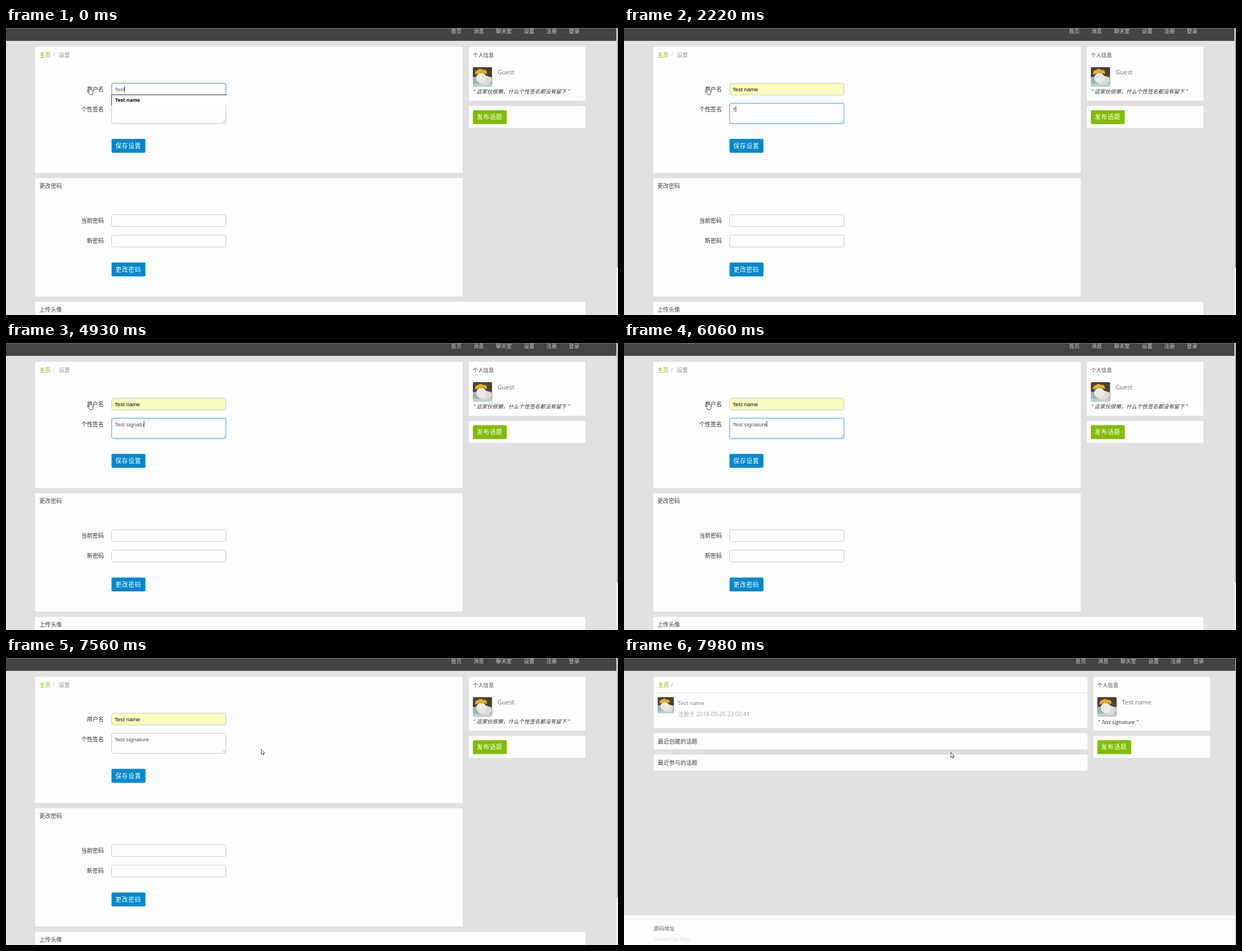
An HTML page for the animation above (8000 ms loop, 1092 by 513 pixels).

```html
<!DOCTYPE html>
<html lang="zh-CN">
<head>
<meta charset="utf-8">
<style>
html, body { margin: 0; width: 100%; height: 100%; overflow: hidden; background: #e1e1e1; }
svg { display: block; width: 1092px; height: 513px; }
text { font-family: "Open Sans", "Noto Sans CJK SC", "Noto Sans CJK", sans-serif; white-space: pre; }
.arial { font-family: "Liberation Sans", Arial, sans-serif; font-size: 9.85px; }
.focus { fill: none; stroke: #52a8ec; stroke-opacity: .85; filter: drop-shadow(0 0 1.5px rgba(82,168,236,.6)); }
</style>
</head>
<body>
<svg viewBox="0 0 1092 513">
  <defs>
    <symbol id="avatar" viewBox="0 0 34 34">
      <rect width="34" height="34" rx="2" fill="#4b4135"/>
      <path d="M0 17H34V32Q34 34 32 34H2Q0 34 0 32Z" fill="#9db5b0"/>
      <path d="M0 29H34V32Q34 34 32 34H2Q0 34 0 32Z" fill="#b9d3d2"/>
      <ellipse cx="21" cy="23" rx="12" ry="8" fill="#dedbd6"/>
      <ellipse cx="15" cy="19" rx="9" ry="9" fill="#ece9e4"/>
      <path d="M4 13Q3 6 9 5Q14 1 18 5Q25 3 25 12Q15 9 4 13Z" fill="#e2ae27"/>
    </symbol>
  </defs>
  <g id="settings"></g>
  <g id="profile"></g>
  <g stroke="#222" stroke-width=".8" fill="#fff" stroke-linejoin="round">
    <path id="hand" d="M3 1q0-1 1-1t1 1V5l3.5.8q1.5.4 1.5 1.8V10l-1 4H4L.5 8.8q-.3-1.2.8-1L3 9.2Z"/>
    <path id="arrow" d="M0 0V9.2L2.1 7.2 3.6 10.7 5 10.1 3.6 6.8H6.4Z"/>
  </g>
</svg>
<script>
const $ = id => document.getElementById(id);
const LOOP = 8000;

// Text is placed by its left edge and vertical centre.
const text = (x, cy, size, fill, s, extra = '') =>
  `<text x="${x}" y="${cy + size * .37}" font-size="${size}" fill="${fill}" ${extra}>${s}</text>`;
const rect = (x, y, w, h, fill, extra = '') =>
  `<rect x="${x}" y="${y}" width="${w}" height="${h}" fill="${fill}" ${extra}/>`;
const panel = (x, y, w, h) => rect(x, y, w, h, '#fdfdfd', 'rx="2"');
const label = (cy, s) => text(174.5, cy, 10.1, '#333', s, 'text-anchor="end"');
const field = (y, h, id = '') =>
  rect(188.5, y, 204, h, '#fdfdfd', `rx="3" stroke="#c8c8c8" id="${id}"`);
const focusRing = (y, h, id) => `<rect class="focus" id="${id}" x="188.5" y="${y}" width="204" height="${h}" rx="3"/>`;
const button = (x, y, fill, s, id = '') =>
  rect(x, y, 60.5, 24.7, fill, `rx="2" id="${id}"`) +
  text(x + 7, y + 12.4, 10.8, '#fff', s, 'letter-spacing=".65"');
const avatar = (x, y, size) => `<use href="#avatar" x="${x}" y="${y}" width="${size}" height="${size}"/>`;

const navItems = [['首页', 794], ['消息', 834], ['聊天室', 874.3], ['设置', 924], ['注册', 964], ['登录', 1004.3]];
const frame = (dx, name) =>
  rect(0, 0, 1092, 23, '#444') + rect(0, 0, 1092, .8, '#858585') +
  navItems.map(([s, x]) => text(x + dx, 5.3, 9.4, '#ccc', s)).join('') +
  panel(826 + dx, 33.5, 208, 96.5) + panel(826 + dx, 139.5, 208, 39) +
  text(833 + dx, 48.3, 9.4, '#444', '个人信息') +
  avatar(833 + dx, 70, 34.5) + text(877 + dx, 79.3, 11, '#777', name) +
  button(833 + dx, 147, '#80bd01', '发布话题');
const italic = 'font-style="italic"';

$('settings').innerHTML =
  rect(0, 0, 1092, 513, '#e1e1e1') + frame(0, 'Guest') +
  text(834, 114, 9.45, '#333', '“', italic) +
  text(839.5, 114, 9.45, '#333', '这家伙很懒，什么个性签名都没有留下', italic) +
  text(1002.5, 114, 9.45, '#333', '”', italic) +
  panel(52, 33.5, 763, 225.5) + panel(52, 268.5, 763, 211.5) + panel(52, 489.5, 982, 40) +
  text(59.5, 48, 10.1, '#80bd01', '主页') + text(83.5, 48, 10.1, '#ccc', '/') + text(94, 48, 10.1, '#999', '设置') +
  text(59.5, 282.7, 10.1, '#444', '更改密码') + text(59.5, 503.7, 10.1, '#444', '上传头像') +
  label(109.3, '用户名') + label(145.3, '个性签名') + label(344, '当前密码') + label(380.5, '新密码') +
  field(98.8, 21, 'user') + focusRing(98.8, 21, 'userFocus') +
  '<text class="arial" id="userText" x="193.7" y="112.6"/>' +
  field(134.5, 36.3) + focusRing(134.5, 36.3, 'signFocus') +
  '<path d="M386.5 169l4.5-4.5M389 169l2-2" stroke="#888" stroke-width=".7"/>' +
  '<text class="arial" id="signText" x="193.7" y="148.5" fill="#555"/>' +
  rect(0, 0, .8, 11.5, '#222', 'id="caret"') +
  '<g id="menu">' + rect(188, 119.2, 206, 19, '#fff') +
  rect(189, 120.2, 205, 17.5, '#e8e8e8', 'id="menuRow"') +
  '<path d="M188.5 138.2V119.5H394" fill="none" stroke="#333"/>' +
  text(195, 129, 8.65, '#000', 'Test name', 'font-weight="700"') + '</g>' +
  field(333.8, 21) + field(370.2, 21.2) +
  button(188.3, 198.3, '#08c', '保存设置', 'save') + button(188.3, 419.2, '#08c', '更改密码') +
  rect(1089, 0, 3, 513, '#f0f0f0') + rect(1090, 0, 2, 428, '#ababab');

$('profile').innerHTML =
  rect(0, 0, 1092, 513, '#e1e1e1') + frame(11.5, 'Test name') +
  text(845.5, 114, 9.6, '#333', '“', italic) +
  text(852, 114, 9.8, '#333', 'Test signature', italic) +
  text(914, 114, 9.6, '#333', '”', italic) +
  panel(53, 33.5, 774, 91.5) + rect(53, 62, 774, 1, '#e5e5e5') +
  panel(53, 134.2, 774, 28.8) + panel(53, 172.7, 774, 28.8) +
  text(60.3, 48, 10.1, '#80bd01', '主页') + text(83.8, 48, 10.1, '#aaa', '/') +
  avatar(60, 70, 29) + text(96, 80.3, 9.8, '#777', 'Test name') +
  text(96, 100.3, 10.1, '#aaa', '注册于 2018-09-26 23:02:41') +
  text(60.3, 149, 10.1, '#444', '最近创建的话题') + text(60.3, 187.2, 10.1, '#444', '最近参与的话题') +
  rect(0, 460, 1092, 53, '#fcfcfc') +
  text(53, 484, 9.4, '#666', '源码地址') + text(53, 502.3, 8.85, '#ddd', 'Powerd By Flask') +
  rect(1091, 0, 1, 513, '#bbb');

// Each timeline holds [start, value...]; a value stays until the next start.
const typing = [[0, 0], [2220, 1], [2370, 2], [2510, 3], [2650, 4], [3110, 5], [3520, 7], [4110, 8],
  [4310, 9], [4510, 10], [4780, 11], [4930, 12], [5080, 13], [5200, 14]];
const caretOn = [[0, 1], [1790, 0], [2220, 1], [5630, 0], [6060, 1], [6780, 0]];
const userGlow = [[0, 1], [1270, .5], [1390, 0]];
const signGlow = [[0, 0], [1270, .5], [1390, 1], [6780, .5], [6900, 0]];
const saveFill = [[0, '#08c'], [6380, '#006ecc'], [6520, '#05c'], [7170, '#006ecc'], [7290, '#08c']];
const pointer = [[0, 'hand', 145.3, 105], [6220, 'arrow', 168, 135], [6380, 'hand', 222, 213],
  [6520, 'hand', 224.5, 206], [7170, 'hand', 231, 203], [7290, 'arrow', 290, 191],
  [7420, 'arrow', 392, 174], [7560, 'arrow', 455.5, 163], [7680, 'arrow', 456.6, 160.6],
  [7830, 'arrow', 515, 165], [7980, 'arrow', 583.2, 168.7]];
const at = (line, t) => line.findLast(k => k[0] <= t).slice(1);
const show = (id, on) => $(id).style.display = on ? '' : 'none';
const set = (id, attrs) => { for (const k in attrs) $(id).setAttribute(k, attrs[k]); };

function draw(t) {
  const filled = t >= 530, inSign = t >= 1270;
  show('settings', t < 7680);
  show('profile', t >= 7680);

  $('userText').textContent = filled ? 'Test name' : 'Test';
  set('userText', { fill: filled ? '#000' : '#555' });
  set('user', { fill: filled ? '#faffbd' : '#fdfdfd' });
  $('signText').textContent = 'Test signature'.slice(0, at(typing, t)[0]);
  set('userFocus', { opacity: at(userGlow, t)[0] });
  set('signFocus', { opacity: at(signGlow, t)[0] });
  show('menu', t < 960);
  show('menuRow', filled);

  const typed = $(inSign ? 'signText' : 'userText');
  set('caret', { x: 193.3 + typed.getComputedTextLength(), y: inSign ? 139.3 : 103.5 });
  show('caret', at(caretOn, t)[0]);
  set('save', { fill: at(saveFill, t)[0], stroke: t >= 6780 ? '#5c9eea' : 'none' });

  const [kind, x, y] = at(pointer, t);
  for (const id of ['hand', 'arrow']) show(id, id === kind);
  set(kind, { transform: `translate(${x} ${y})` });
}

const start = performance.now();
function tick() {
  draw((performance.now() - start) % LOOP);
  requestAnimationFrame(tick);
}
tick();
</script>
</body>
</html>
```
